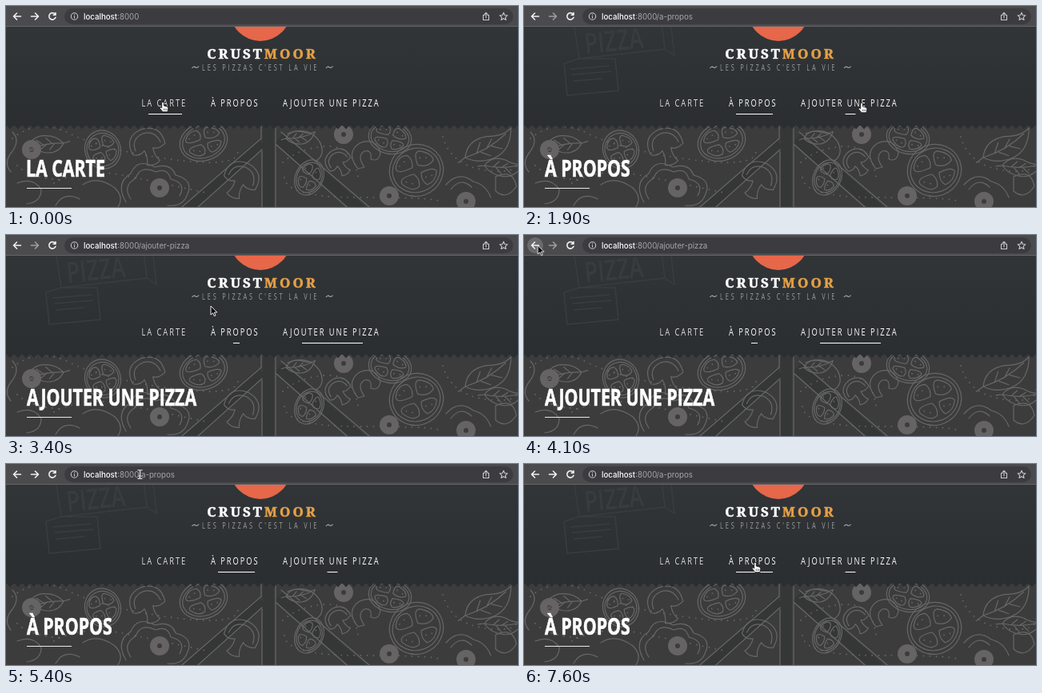
Write an HTML page that moves like this. It is 640 by 252 pixels and loops after 8000 ms.

```html
<!DOCTYPE html>
<html lang="fr">
<head>
<meta charset="utf-8">
<title>La carte</title>
<style>
html, body { margin: 0; width: 100%; height: 100%; overflow: hidden; background: #3c3c3c; }
svg { display: block; width: 100vw; height: 100vh; }
.line { fill: none; stroke: #686767; stroke-width: 1.2; stroke-linecap: round; stroke-linejoin: round; }
#tomato *, #leaf *, #shroom * { vector-effect: non-scaling-stroke; }
.dots { stroke-width: 1.8; stroke-dasharray: 0 8; }
.disc { fill: none; stroke: #666364; stroke-width: 9; }
.gap { fill: none; stroke: #353636; stroke-width: 14; }
.faint { fill: none; stroke: #393d40; stroke-width: 1.5; }
.icon { fill: none; stroke: #f0f1f2; stroke-width: 1.6; stroke-linecap: round; stroke-linejoin: round; }
.thin { stroke: #c8c9cb; stroke-width: 1.1; }
.url { font: 9.7px Inter, Roboto, sans-serif; fill: #a5a6a9; }
.host { fill: #fff; font-weight: 550; }
.brand { font: 900 17px "Noto Serif", serif; letter-spacing: 3px; fill: #fff; stroke: #fff; stroke-width: .5; text-anchor: middle; }
.brand tspan { fill: #e5a148; stroke: #e5a148; }
.sans { font-family: "Open Sans", "Noto Sans", sans-serif; }
.tag { font-size: 10.3px; font-weight: 400; letter-spacing: 3.93px; fill: #9a9c9d; }
.menu { font-size: 13px; font-weight: 400; letter-spacing: 2.7px; fill: #fff; }
.title { font-size: 29px; font-weight: 700; fill: #fff; stroke: #fff; stroke-width: .7; }

.bar { fill: #fff; transform-box: fill-box; transform-origin: center; animation: 8s infinite; }
.swap { animation: 8s step-end infinite; }
#cursor { animation: move 8s linear infinite; }

#barCard { animation-name: barCard; }
#barAbout { animation-name: barAbout; }
#barAdd { animation-name: barAdd; }
#titleCard { animation-name: titleCard; }
#titleAbout { animation-name: titleAbout; }
#titleAdd { animation-name: titleAdd; }
#pathAbout { animation-name: pathAbout; }
#pathAdd { animation-name: pathAdd; }
#hand { animation-name: hand; }
#arrow { animation-name: arrow; }
#beam { animation-name: beam; }
#press { animation-name: press; }
#forward { animation-name: forward; }
#box { animation-name: box; }

@keyframes move {
  0% { transform: translate(196px, 120px); }
  1.25% { transform: translate(196px, 120px); animation-timing-function: steps(3); }
  5% { transform: translate(240px, 122px); animation-timing-function: steps(4); }
  10% { transform: translate(285px, 122px); }
  20% { transform: translate(285px, 122px); animation-timing-function: steps(3); }
  23.75% { transform: translate(422px, 121px); animation-timing-function: steps(6); }
  31.25%, 36.25% { transform: translate(420px, 122px); animation-timing-function: steps(5); }
  42.5% { transform: translate(256px, 89px); animation-timing-function: steps(4); }
  47.5% { transform: translate(24px, 16px); animation-timing-function: steps(4); }
  52.5%, 60% { transform: translate(15px, 12px); animation-timing-function: steps(6); }
  67.5% { transform: translate(167.5px, 13px); animation-timing-function: steps(3); }
  71.25% { transform: translate(188px, 13px); animation-timing-function: steps(9); }
  82.5% { transform: translate(249px, 84px); animation-timing-function: steps(10); }
  95%, 100% { transform: translate(289px, 123px); }
}
@keyframes barCard {
  0%, 13.75% { transform: scaleX(1); animation-timing-function: steps(4); }
  18.75%, 100% { transform: scaleX(0); }
}
@keyframes barAbout {
  0%, 5% { transform: scaleX(0); animation-timing-function: steps(4); }
  10%, 31.25% { transform: scaleX(1); animation-timing-function: steps(2); }
  33.75%, 53.75% { transform: scaleX(.174); animation-timing-function: steps(2); }
  56.25% { transform: scaleX(.54); animation-timing-function: steps(2); }
  58.75%, 100% { transform: scaleX(1); }
}
@keyframes barAdd {
  0%, 22.5% { transform: scaleX(0); animation-timing-function: steps(1); }
  23.75% { transform: scaleX(.17); animation-timing-function: steps(4); }
  28.75%, 53.75% { transform: scaleX(1); animation-timing-function: steps(2); }
  56.25% { transform: scaleX(.52); animation-timing-function: steps(2); }
  58.75%, 100% { transform: scaleX(.17); }
}
@keyframes titleCard { 0% { opacity: 1; } 13.75%, 100% { opacity: 0; } }
@keyframes titleAbout { 0% { opacity: 0; } 13.75% { opacity: 1; } 32.5% { opacity: 0; } 55%, 100% { opacity: 1; } }
@keyframes titleAdd { 0% { opacity: 0; } 32.5% { opacity: 1; } 55%, 100% { opacity: 0; } }
@keyframes pathAbout { 0% { opacity: 0; } 13.75% { opacity: 1; } 32.5% { opacity: 0; } 57.5%, 100% { opacity: 1; } }
@keyframes pathAdd { 0% { opacity: 0; } 32.5% { opacity: 1; } 57.5%, 100% { opacity: 0; } }
@keyframes hand { 0% { opacity: 1; } 38.75% { opacity: 0; } 80%, 100% { opacity: 1; } }
@keyframes arrow { 0% { opacity: 0; } 38.75% { opacity: 1; } 63.75% { opacity: 0; } 73.75% { opacity: 1; } 80%, 100% { opacity: 0; } }
@keyframes beam { 0% { opacity: 0; } 63.75% { opacity: 1; } 73.75%, 100% { opacity: 0; } }
@keyframes press { 0% { opacity: 0; } 48.75% { opacity: 1; } 61.25%, 100% { opacity: 0; } }
@keyframes forward { 0% { opacity: 1; } 13.75% { opacity: .5; } 55%, 100% { opacity: 1; } }
@keyframes box { 0% { opacity: 0; } 1.25%, 100% { opacity: 1; } }
</style>
</head>
<body>
<svg viewBox="0 0 640 252" preserveAspectRatio="none">
  <defs>
    <linearGradient id="shade" x2="0" y2="1">
      <stop offset="0" stop-color="#313538"/>
      <stop offset="1" stop-color="#2b2e31"/>
    </linearGradient>
    <pattern id="teeth" width="10" height="6" y="149" patternUnits="userSpaceOnUse">
      <path d="M0 0H10L5 5.5Z" fill="#2b2e31"/>
    </pattern>
    <clipPath id="page"><rect y="26" width="640" height="226"/></clipPath>

    <g id="tomato">
      <ellipse rx="36" ry="27"/>
      <ellipse rx="32" ry="23"/>
      <path d="M-4-4Q-26-2-25-9Q-18-21-5-18Q1-12-4-4ZM4-5Q4-19 12-18Q27-12 26-4Q15 2 4-5ZM-5 3Q-27 1-24 9Q-14 21-4 17Q1 10-5 3ZM5 4Q23 2 25 8Q19 18 7 18Q1 12 5 4Z"/>
      <path class="dots" d="M-19-10Q-12-15-7-11M10-11Q17-11 21-6M-18 8Q-12 14-7 10M9 10Q14 13 20 9"/>
    </g>
    <g id="leaf">
      <path d="M0 0Q2-20 24-24Q44-24 52-34Q52-8 34 0Q16 8 0 0ZM-8 6L0 0Q26-8 46-27M13-5L17-17M24-10L30-21M18-6L29-2M30-13L42-10"/>
    </g>
    <g id="shroom">
      <path d="M-22 4Q-26-22 0-24Q26-22 23 4Q12 9 6 4Q4 15 9 23Q0 28-9 23Q-4 14-6 4Q-14 9-22 4ZM-17 0Q-17-17 0-18Q16-17 18 0"/>
    </g>
  </defs>

  <rect width="640" height="252" fill="#3c3c3c"/>
  <path class="gap" d="M328 150V252M320 172L224 258M341 166L446 258"/>
  <g class="line">
    <path d="M319 150V166L220 252M320 180L240 252M337 150V252M344 158L454 252M338 174L426 252M320 182V252"/>
    <use href="#tomato" transform="translate(121 180) rotate(-20) scale(.62 .9)"/>
    <use href="#tomato" transform="translate(247 170) rotate(-18) scale(.84 .88)"/>
    <use href="#tomato" transform="translate(379 215) rotate(25) scale(.48 .85)"/>
    <use href="#tomato" transform="translate(480 165) rotate(12) scale(.75)"/>
    <use href="#tomato" transform="translate(513 206) rotate(-20) scale(.94 1.2)"/>
    <use href="#leaf" transform="translate(574 190) scale(1.1)"/>
    <use href="#leaf" transform="translate(598 200) rotate(30) scale(.8)"/>
    <use href="#leaf" transform="translate(350 166) rotate(20) scale(.6)"/>
    <use href="#leaf" transform="translate(72 172) rotate(-160) scale(.8)"/>
    <use href="#shroom" transform="translate(177 176) rotate(-20) scale(.95)"/>
    <use href="#shroom" transform="translate(293 218) rotate(25) scale(.95)"/>
    <use href="#shroom" transform="translate(416 196) rotate(-35) scale(.7)"/>
    <path d="M150 246Q136 222 156 210Q164 190 186 202Q206 196 212 212Q236 218 226 238Q220 252 202 250M156 242Q145 226 162 216Q168 199 187 208Q202 202 206 217Q226 222 217 238"/>
    <path d="M440 204Q424 184 442 172Q462 164 468 184Q466 196 456 192Q458 180 448 182Q438 188 448 202ZM96 224Q114 212 136 228Q148 240 140 252M62 250Q72 232 92 242M8 158Q18 168 8 182Q-4 196 6 208M14 222Q34 214 44 230Q44 246 26 248M352 160Q378 150 392 170Q400 186 388 194M550 224Q566 206 584 220Q600 224 606 240M556 230Q568 214 582 227M612 214Q634 204 638 226Q626 244 612 232Z"/>
    <path class="dots" d="M8 166Q40 140 80 160T205 192T290 182M60 222Q95 202 145 212T250 234M346 196Q366 178 400 176T440 214M348 215Q350 240 440 240T540 244M546 164Q556 200 600 206T640 190M14 200Q30 216 70 218"/>
  </g>
  <g class="disc">
    <circle cx="32" cy="180" r="7.5"/>
    <circle cx="192" cy="228" r="7.5"/>
    <circle cx="422" cy="161" r="7.5"/>
    <circle cx="479" cy="238" r="7.5"/>
    <circle cx="575" cy="245" r="7.5"/>
  </g>

  <rect y="26" width="640" height="124" fill="url(#shade)"/>
  <rect y="149" width="640" height="6" fill="url(#teeth)"/>
  <g clip-path="url(#page)">
    <g id="box" class="swap">
      <path class="faint" d="M62 20L69 66L176 54L172 20M69 66L50 72L54 112L118 106L114 66ZM58 79L107 75M60 86L109 82M62 94L98 91M176 54L188 62L184 26"/>
      <text class="sans" transform="translate(77 60) rotate(-6) scale(.75 1)" font-size="36" font-weight="600" fill="#383c3f">PIZZA</text>
    </g>
    <circle cx="318" cy="6" r="38" fill="#e6674a"/>
  </g>

  <text class="brand" x="320.5" y="66">CRUST<tspan>MOOR</tspan></text>
  <path d="M232.5 78q2-3 4.3-1.3t4.3-1.2M400 78q2-3 4.3-1.3t4.3-1.2" fill="none" stroke="#a6a8a9" stroke-width="1.1"/>
  <g class="sans">
    <text class="tag" transform="translate(245 81) scale(.72 1)">LES PIZZAS C'EST LA VIE</text>
    <g class="menu">
      <text transform="translate(169.5 126) scale(.72 1)" fill="#dcdcdc">LA CARTE</text>
      <text transform="translate(256 126) scale(.72 1)">À PROPOS</text>
      <text transform="translate(346 126) scale(.72 1)">AJOUTER UNE PIZZA</text>
    </g>
    <g class="title">
      <text id="titleCard" class="swap" transform="translate(25 214) scale(.735 1)">LA CARTE</text>
      <text id="titleAbout" class="swap" transform="translate(26 214) scale(.735 1)">À PROPOS</text>
      <text id="titleAdd" class="swap" transform="translate(26 214) scale(.735 1)">AJOUTER UNE PIZZA</text>
    </g>
  </g>
  <rect id="barCard" class="bar" x="178" y="135" width="42" height="1"/>
  <rect id="barAbout" class="bar" x="265" y="135" width="46" height="1"/>
  <rect id="barAdd" class="bar" x="370" y="135" width="76" height="1"/>
  <rect x="26" y="228" width="56" height="1" fill="#e8e8e8"/>

  <rect width="640" height="26" fill="#4b4b4e"/>
  <rect y="25" width="640" height="1" fill="#646466"/>
  <rect x="73" y="3" width="561" height="20" rx="10" fill="#3c3c40"/>
  <circle id="press" class="swap" cx="14" cy="13" r="10" fill="#6a6a6d"/>
  <path class="icon" d="M18.5 13H9.5M13.5 9L9.5 13L13.5 17"/>
  <path id="forward" class="icon swap" d="M31.5 13H40.5M36.5 9L40.5 13L36.5 17"/>
  <path class="icon" d="M61.3 10.2A4.2 4.2 0 1 0 62 14.3M62 8.5V11.3H59.2"/>
  <g class="icon thin">
    <circle cx="85.5" cy="13" r="4.2"/>
    <path d="M85.5 12.8V15M85.5 10.8V10.9M598 11.5H596.5V17.5H603.5V11.5H602M600 15V8.5M598 10.3L600 8.3L602 10.3"/>
    <path d="M622 8.3L623.4 11.5L626.8 11.8L624.2 14.1L625 17.5L622 15.7L619 17.5L619.8 14.1L617.2 11.8L620.6 11.5Z"/>
  </g>
  <g class="url">
    <text x="97" y="16.6"><tspan class="host">localhost</tspan>:8000</text>
    <text id="pathAbout" class="swap" x="165.5" y="16.6">/a-propos</text>
    <text id="pathAdd" class="swap" x="165.5" y="16.6">/ajouter-pizza</text>
  </g>

  <g id="cursor">
    <g id="hand" class="swap" stroke="#111" stroke-width=".8">
      <path d="M-1.3 1Q0-.6 1.3 1V5L5 6Q7 6.5 6.8 8.4L6 12.7H0L-3.6 8.4Q-4.2 6.5-2.5 6.9L-1.3 8Z" fill="#fff"/>
      <path d="M1.2 8.5V11M3 8.5V11M4.8 8.5V11" stroke-width=".6"/>
    </g>
    <path id="arrow" class="swap" d="M0 0V11L2.6 8.7L4.3 12.6L6 11.9L4.4 8H7.8Z" fill="#080808" stroke="#fff" stroke-width=".9"/>
    <path id="beam" class="swap" d="M-2.6-5.5Q0-5.5 0-4Q0-5.5 2.6-5.5M0-4V4M-2.6 5.5Q0 5.5 0 4Q0 5.5 2.6 5.5M-1.4 2H1.4" fill="none" stroke="#e4e4e4" stroke-width="1.2" stroke-linecap="round"/>
  </g>
</svg>
</body>
</html>
```
